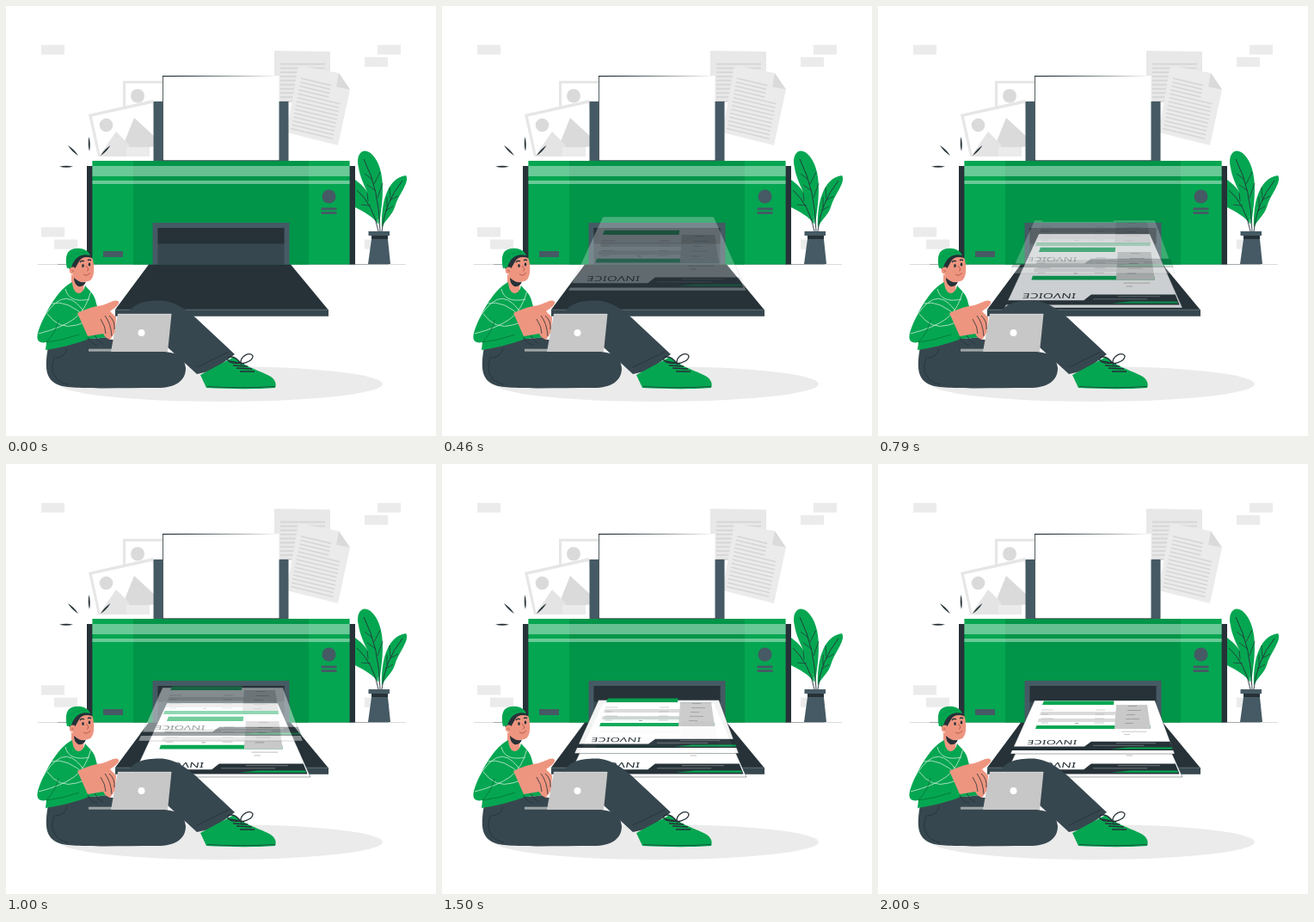
An HTML page with a canvas that plays this animation: 500x500 px, repeating every 2.04 s.

```html
<!DOCTYPE html>
<html lang="en">
<head>
<meta charset="utf-8">
<title>Printer</title>
<style>
html, body { margin: 0; width: 100%; height: 100%; overflow: hidden; background: #fff; }
canvas { display: block; width: 500px; height: 500px; }
</style>
</head>
<body>
<canvas id="stage" width="500" height="500"></canvas>
<script>
const LOOP = 2040;
const GREEN = '#05a651', DEEP = '#009548', INK = '#263238', SLATE = '#37474f',
  STEEL = '#455a64', PALE = '#ebebeb', MIST = '#dadada', SKIN = '#ee9580';

const stage = document.getElementById('stage').getContext('2d');
let c = stage;

function layer() {
  const cv = document.createElement('canvas');
  cv.width = cv.height = 500;
  return cv.getContext('2d');
}
const back = layer(), front = layer(), page = layer();

function rect(x, y, w, h, fill) {
  c.fillStyle = fill;
  c.fillRect(x, y, w, h);
}
function shape(d, fill) {
  c.fillStyle = fill;
  c.fill(new Path2D(d));
}
function line(d, color = INK, w = 1) {
  c.strokeStyle = color;
  c.lineWidth = w;
  c.stroke(new Path2D(d));
}
function dot(x, y, rx, fill, ry = rx) {
  c.fillStyle = fill;
  c.beginPath();
  c.ellipse(x, y, rx, ry, 0, 0, Math.PI * 2);
  c.fill();
}
// Stroke that narrows at both ends
function spark(x1, y1, x2, y2) {
  const mx = (x1 + x2) / 2, my = (y1 + y2) / 2;
  const len = Math.hypot(x2 - x1, y2 - y1);
  const nx = (y1 - y2) / len * 2, ny = (x2 - x1) / len * 2;
  shape(`M${x1} ${y1}Q${mx + nx} ${my + ny} ${x2} ${y2}Q${mx - nx} ${my - ny} ${x1} ${y1}Z`, INK);
}
// Linear interpolation through [time, value] points
function track(t, keys) {
  if (t <= keys[0][0]) return keys[0][1];
  for (let i = 1; i < keys.length; i++) {
    const [t0, a] = keys[i - 1], [t1, b] = keys[i];
    if (t < t1) return a + (b - a) * (t - t0) / (t1 - t0);
  }
  return keys[keys.length - 1][1];
}

function drawWall() {
  const bricks = [[41, 45.3], [432, 45.3], [417, 59.5], [41, 257.3], [56, 271.500], [417, 271.500]];
  for (const [x, y] of bricks) rect(x, y, 27, 11.2, PALE);

  // Pictures
  rect(136, 87, 50, 60, '#e6e6e6');
  rect(139, 90, 47, 57, '#fff');
  dot(153, 104.5, 8, MIST);
  shape('M96 126L171 109L183 165L182 175L107 175Z', '#e6e6e6');
  shape('M100 128.5L170 113L182 163L182 175L110 175Z', '#fff');
  dot(116.5, 138.5, 7.8, MIST);
  shape('M137 160L149 130L174 153L175 163L142 167Z', MIST);
  shape('M108 175L128 146L144 162L141 175Z', '#e4e4e4');
  rect(140, 164, 27, 11, PALE);

  // Text pages
  shape('M312 52L377 53L377 112L312 112Z', '#e8e8e8');
  for (let i = 0; i < 10; i++) line(`M319 ${67.5 + i * 4.8}H371`, '#d6d6d6', 1.8);
  shape('M340 69L387 78L400 97L386 162L326 147Z', PALE);
  shape('M387 78L400 97L384 94Z', MIST);
  for (let i = 0; i < 14; i++) {
    const x = 343 - i * 0.9, y = 84 + i * 4.5, w = i < 4 ? 35 : 49;
    line(`M${x} ${y}l${w} ${w * 0.24}`, '#d6d6d6', 1.7);
  }
}

function drawPlant() {
  shape('M433 254C431 230 420 210 404 201L404 233C417 240 426 244 433 254Z', GREEN);
  shape('M434 254C437 232 445 190 424 171C415 164 406 172 410 188C413 208 428 226 434 254Z', GREEN);
  shape('M437 258C436 232 442 200 465 197C470 204 457 219 453 231C449 245 442 246 437 258Z', GREEN);
  line('M416 178Q434 213 435 262M408 214Q427 231 433 262M461 203Q440 229 437 262', INK, 0.9);
  line('M426 202l-9 -7M430 215l-10 -7M428 207l7 -14M432 223l6 -17M421 227l-1 -10M424 232l-11 -1' +
    'M447 224l-1 -13M443 234l0 -12M446 226l10 -5M441 238l9 -5', INK, 0.7);
  rect(421.5, 262, 24.5, 5, STEEL);
  rect(425, 267, 19, 4, INK);
  shape('M425 271H444L447 300H421Z', STEEL);
}

function drawPrinter() {
  line('M37 300.5H465', '#c9cdcf', 0.7);
  line('M60 300.5H445', '#7d868b', 0.6);
  rect(171.5, 111, 11, 70, STEEL);
  rect(317, 111, 11.5, 70, STEEL);
  rect(182, 81, 135.5, 99, '#fff');
  line('M182.5 180V81', INK, 0.8);
  shape('M182 81H318L182 82.2Z', INK);

  rect(94, 186, 7, 114.5, INK);
  rect(399, 186, 7, 114.5, INK);
  rect(100.4, 180, 299.2, 120.5, GREEN);
  rect(148, 180, 204, 120.5, DEEP);
  rect(100.4, 186, 299.2, 12, 'rgba(255,255,255,.4)');
  rect(100.4, 203, 299.2, 4, 'rgba(255,255,255,.4)');
  line('M182 179.7H318', INK, 0.8);
  dot(375.5, 221.5, 8, STEEL);
  rect(366.5, 234.5, 18, 2.8, STEEL);
  rect(366.5, 239.2, 18, 2.8, STEEL);
  rect(113, 285, 23, 7, STEEL);

  rect(170.5, 252, 159, 48.5, STEEL);
  rect(176.5, 258, 147, 42.5, SLATE);
  rect(176.5, 258, 147, 18.5, INK);
  shape('M166 300.5H331L374.5 353H127Z', INK);
  rect(127, 353, 248, 7.8, SLATE);
  line('M127 353.2H374.5', '#8b979d', 0.5);
}

function drawBack() {
  c = back;
  drawWall();
  dot(250, 439.5, 188, PALE, 20.5);
  spark(72, 162, 84, 174);
  spark(96.5, 152, 97, 169);
  spark(121.5, 162, 110, 174);
  spark(62, 186.7, 78, 186.7);
  drawPlant();
  drawPrinter();
}

function drawHead() {
  shape('M76 312L76 330Q83 338 90 333L91 317Z', SKIN);
  shape('M79 316Q88 324 93 320Q91 327 84 326Q79 323 79 316Z', INK);
  shape('M78 299C82 289 98 287 101 295C103 304 103 315 98 319C90 323 80 319 77 310Z', SKIN);
  shape('M73 303L78 290L99 288L100 293Q89 290 85 297L81 304L78 311Q74 309 73 303Z', INK);
  dot(77.5, 307.5, 3.7, SKIN, 4);
  shape('M71 305C68 291 71 282 82 282C90 281 96 285 98 290C87 287 79 293 76 304Z', GREEN);
  line('M72 294Q78 286 94 286M72 298l4 -2M76 291l4 2M83 287l2 3M90 286l2 3', DEEP, 0.7);
  dot(89.5, 302, 1.3, INK, 1.9);
  dot(97, 300.5, 1.3, INK, 1.9);
  line('M86 298Q88 295 91 297M95 296Q97 294 99 296', INK, 1.4);
  line('M93 302Q98 307 94 308M90 312Q94 315 98 310M76 307l3 2', '#a84f43', 0.8);
}

function drawBody() {
  // Raised leg, then the folded one
  shape('M140 360C147 345 163 342 182 342.5C198 344 209 353 220 362L266 405L240 424L222 428L188 397Z', SLATE);
  line('M222 420L259 402', INK, 0.8);
  shape('M49 396C45 419 45 435 62 441C75 446 130 444 176 444C197 444 209 436 209 421C208 408 198 402 181 402L125 388L95 386Z', SLATE);
  line('M57 408C50 421 55 437 72 440M58 409Q69 408 71 398', INK, 0.8);

  // Sweater
  const top = 'M77 321C61 329 47 354 39 374C34 387 36 393 47 391L46 400Q73 396 97 387L122 385L124 377L111 365L105 346C103 335 98 332 92 325C89 338 78 337 77 321Z';
  shape(top, GREEN);
  c.save();
  c.clip(new Path2D(top));
  line('M40 369Q65 322 88 352T126 388M53 346Q71 341 94 363T112 348M38 381Q65 374 79 364T99 331' +
    'M48 358Q62 377 82 371T109 359M69 329Q73 346 97 341', '#b7e4ca', 0.9);
  c.restore();
  line('M47 391Q65 389 85 382M61 365Q59 378 47 391', '#04713a', 0.8);

  // Laptop base, hands and lid
  shape('M93 388L119 385L126 400L96 400Z', SLATE);
  rect(96, 398.7, 66, 3, '#9da4a7');
  shape('M83 357Q100 349 112 348C122 345 127 340 131 344C132 348 125 352 121 355L128 362L127 379L121 388Q115 386 113 381L95 384Z', SKIN);
  line('M110 364Q116 373 116 381M115 360Q122 369 123 384M120 360Q127 366 126 376M95 385Q98 393 106 394M103 383Q107 391 113 393', INK, 0.8);
  shape('M130 358H192.5L188 402H122Z', '#c7c7c7');
  line('M130 358.3H192', '#dedede', 0.7);
  dot(157.5, 380, 4, '#fff');
}

function drawShoe() {
  shape('M226 429L265 408C276 418 291 423 302 428C313 432 315 439 313 444C284 446 259 445 233 444Z', GREEN);
  line('M234 442.5Q272 445 313 442.5', INK, 0.7);
  line('M260 413L277 416M264 418L281 419M268 421L286 422M272 425L289 425', INK, 1.3);
  line('M272 415C258 417 253 408 262 408C268 408 271 413 273 416C272 407 284 401 287 407C287 412 280 415 273 416', INK, 1.3);
}

function drawFront() {
  c = front;
  drawHead();
  drawBody();
  drawShoe();
}

function drawInvoice(detail, total) {
  shape('M193 275.5H274.5L274 280H191Z', GREEN);
  shape('M189.5 288H277L276.5 292H188Z', MIST);
  shape('M187 296H276.5L276 300H185.5Z', MIST);
  shape('M184.5 304H316.5L317 308H183Z', GREEN);
  shape(`M277 280H313L317 ${total}H275Z`, '#c9c9c9');
  for (let i = 0; i < 5; i++) {
    const y = 281.5 + i * 5;
    line(`M${291 - i} ${y}h${i % 2 ? 16 : 10}`, '#858585', 0.6);
    if (i < 4) line(`M${253 - i * 0.5} ${y + 4.5}h11M190 ${y + 4.5}h${i % 2 ? 8 : 14}`, '#a3a3a3', 0.5);
  }
  line('M229 301.5h4', '#777', 0.6);
  c.save();
  c.globalAlpha = detail;
  line('M283 311.2H312M286 314.5H293', '#a3a3a3', 0.6);
  c.restore();

  // Title lies flat, read from the far side
  c.save();
  c.translate(232, 321.4);
  c.transform(-1, 0, 0.1, -0.5, 0, 0);
  c.font = '500 14.5px "Noto Sans", "Open Sans", sans-serif';
  c.fillStyle = INK;
  c.fillText('INVOICE', 0, 0);
  c.restore();

  shape('M157 328.5H240L248 322.8H339.5L344 333H155Z', INK);
  line('M277 324.6H323M250 327.3H309', '#84898c', 0.7);
  shape('M291 329.5H341.5L342.5 331.5H270Z', GREEN);
}

function drawSheet(alpha, paper, dy, content, contentDy) {
  if (alpha <= 0) return;
  c = page;
  c.clearRect(0, 0, 500, 500);
  c.save();
  c.translate(0, dy);
  shape(paper, '#fff');
  line(paper, 'rgba(38,50,56,.7)', 0.6);
  c.restore();
  c.save();
  c.translate(0, contentDy);
  content();
  c.restore();
  stage.globalAlpha = Math.min(1, alpha);
  stage.drawImage(page.canvas, 0, 0);
  stage.globalAlpha = 1;
}

function drawLower(t) {
  const dy = track(t, [[80, -48], [460, -33], [790, -13], [1000, 0]]);
  const alpha = track(t, [[60, 0], [460, 0.27], [790, 0.77], [1000, 1]]);
  drawSheet(alpha, 'M187 278H316L354 364H147Z', dy, () => {
    // Nearer sheet: larger, measured from its title
    c.translate(250, 350);
    c.scale(1.07, 1.16);
    c.translate(-250, -324);
    drawInvoice(1, 308);
  }, dy);
}

function drawUpper(t) {
  const dy = track(t, [[560, -37], [790, -26], [1000, -15], [1210, -9], [1500, -0.5], [1600, 0]]);
  const cy = track(t, [[560, -40], [790, -29], [1000, -17], [1210, -11.5], [1500, -3], [1690, 0]]);
  const detail = track(t, [[1680, 0], [1990, 1]]);
  const total = track(t, [[1210, 304], [1500, 308]]);
  drawSheet((t - 560) / 1000, 'M182 275H322L345 337H154Z', dy, () => drawInvoice(detail, total), cy);
}

function frame(now) {
  const t = now % LOOP;
  stage.fillStyle = '#fff';
  stage.fillRect(0, 0, 500, 500);
  stage.drawImage(back.canvas, 0, 0);
  if (t >= 80) {
    drawLower(t);
    drawUpper(t);
  }
  stage.drawImage(front.canvas, 0, 0);
  requestAnimationFrame(tick);
}

let start = null;
function tick(now) {
  if (start === null) start = now;
  frame(now - start);
}

drawBack();
drawFront();
frame(0);
</script>
</body>
</html>
```
